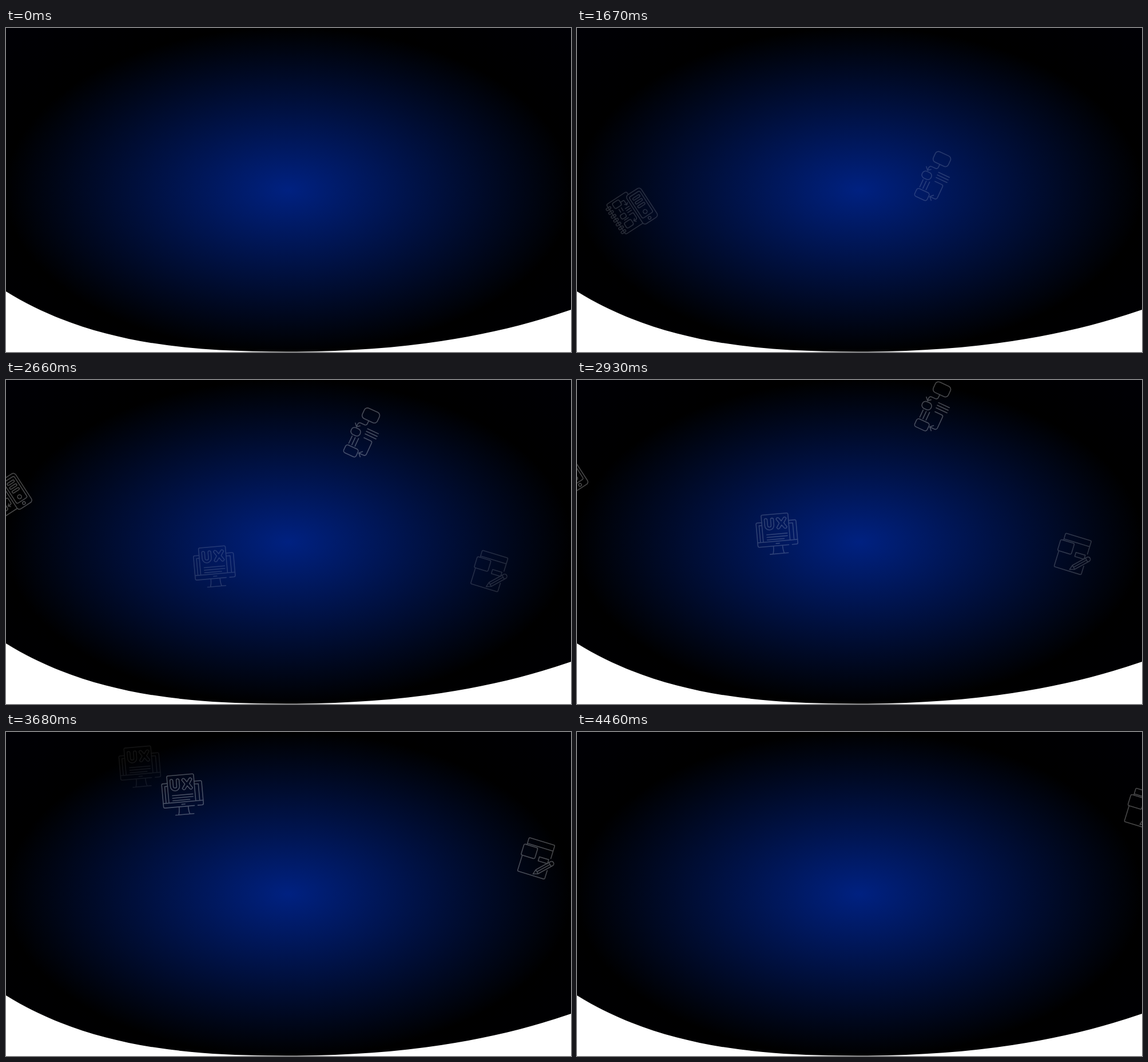
These frames come from a looping animation (988x567 px, 4.49 s). An HTML page:

```html
<!DOCTYPE html>
<html lang="en">
<head>
<meta charset="utf-8">
<title>Floating icons</title>
<style>
html, body { margin: 0; width: 100%; height: 100%; overflow: hidden; background: #fff; }
#stage { position: relative; width: 988px; height: 567px; overflow: hidden; }
#sky {
  position: absolute; inset: 0;
  background: radial-gradient(ellipse farthest-corner at 50% 50%, #002181, #000 71%, #000005);
}
svg { position: absolute; inset: 0; display: block; }
.icon { fill: none; stroke: #fff; stroke-width: 1.6; stroke-linecap: round; stroke-linejoin: round; }
</style>
</head>
<body>
<div id="stage">
  <div id="sky"></div>
  <svg id="view" width="988" height="567" viewBox="0 0 988 567">
    <defs>
      <g id="flow">
        <rect x="-13" y="-42.5" width="29" height="20" rx="6"/>
        <path d="M2-22.5V-17q0 4-4 4H-9q-4 0-4 4V-4M-17.5-9l4.5 5 5-4"/>
        <rect x="-19" y="-2" width="17" height="13" rx="6"/>
        <path d="M-13 14V28M-7 14V28M-1 13V28"/>
        <rect x="-16" y="31" width="24" height="15" rx="4"/>
        <path d="M6-9H27M6-4H27M6 1H27"/>
        <path d="M7 8H20q3 0 3 3V32q0 4-4 4H11M15 31l-5 5 5 5"/>
      </g>
      <g id="book">
        <path d="M4 28H-29q-3 0-3-3V-31q0-3 3-3H7q3 0 3 3v3"/>
        <g id="rings"></g>
        <rect x="-23" y="-30" width="14" height="11" rx="3"/>
        <path d="M-9-24h5q2 0 2 2v7M-5-17l3 3 3-3"/>
        <rect x="-23" y="-5" width="10" height="8" rx="3"/>
        <path d="M-18-9v-6M-13-9v-6M-8-10H0M-8-6H0M-8-2H0"/>
        <rect x="-24" y="10" width="14" height="11" rx="3"/>
        <path d="M-20 6h8M-8 3h6q2 0 2 2v8q0 3-3 3H-7M-4 13l-3 3 3 3"/>
        <rect x="4" y="-28" width="30" height="60" rx="5"/>
        <rect x="8" y="-23" width="22" height="44" rx="3"/>
        <rect x="12" y="-18" width="14" height="4" rx="2"/>
        <rect x="12" y="-10" width="14" height="4" rx="2"/>
        <rect x="12" y="-2" width="14" height="4" rx="2"/>
        <circle cx="18.5" cy="13" r="3.5"/>
        <circle cx="19" cy="26.5" r="2.5"/>
      </g>
      <g id="screen">
        <path d="M-25 12V-33q0-2 2-2H20q2 0 2 2V12"/>
        <path d="M-25-22h-8q-2 0-2 2V18q0 2.5 2.5 2.5H19M25 20.5h7.5q2.5 0 2.5-2.5V-20q0-2-2-2H22"/>
        <path d="M-25-17h-5V12M22-17h7V12M-35 12.5H35M-3 16.5H3"/>
        <path d="M-20-26v10a8 8 0 0 0 16 0v-10a2.5 2.5 0 0 0-5 0v10a3 3 0 0 1-6 0v-10a2.5 2.5 0 0 0-5 0z"/>
        <path d="M.5-26Q2.500-30 5.500-27.500L9.500-22 13.500-27.500Q16.500-30 18.500-26L13.500-18.500 18.500-11Q16.500-7 13.500-9.500L9.500-15 5.500-9.500Q2.500-7 .5-11L5.500-18.500Z"/>
        <path d="M-18 0H18M-18 4.500H18M-18 9H12"/>
        <path d="M-8 21Q-8 30-10 34.500M8 21Q8 30 10 34.500M-15 34.500H17"/>
      </g>
      <g id="draft">
        <path d="M-22-19.500V-30q0-2 2-2H23q2 0 2 2V-8M-22-21.500H25"/>
        <rect x="-27" y="-19" width="25" height="20" rx="2.500"/>
        <path d="M-24.500 1V28q0 2 2 2H23q2 0 2-2V14"/>
        <rect x="5" y="-5" width="17" height="7.500"/>
        <path transform="translate(3 27) rotate(-46)" d="M0 0L8-4H37a4 4 0 0 1 0 8H8zM8-4V4M9 0H33M34-4V4"/>
      </g>
    </defs>
    <g id="icons"></g>
    <path fill="#fff" d="M0 461C150 554 325 566.500 490 566.500C680 566.500 840 544 988 493V567H0Z"/>
  </svg>
</div>
<script>
const NS = "http://www.w3.org/2000/svg";
const LOOP = 4490, FIRST = 650, STEP = 30;
const FADE = 1900, PEAK = 0.28;

function add(parent, tag, attrs) {
  const el = document.createElementNS(NS, tag);
  for (const k in attrs) el.setAttribute(k, attrs[k]);
  return parent.appendChild(el);
}

const rings = document.getElementById("rings");
for (let i = 0; i < 7; i++) {
  add(rings, "rect", { x: -37, y: -28 + i * 8, width: 9, height: 4, rx: 2 });
}

// Each icon drifts in a straight line through (x, y) at time "at"; speeds in px per ms.
const icons = [
  { shape: "flow",   start: 640,  at: 2180, x: 623, y: 172, vx: 0,       vy: -0.169,  turn: 25 },
  { shape: "book",   start: 640,  at: 1130, x: 148.7, y: 384, vx: -0.0965, vy: -0.118, turn: -33 },
  { shape: "screen", start: 1690, at: 3200, x: 335, y: 212, vx: -0.0545, vy: -0.2127, turn: -5 },
  { shape: "draft",  start: 1690, at: 3200, x: 888, y: 275, vx: 0.0803,  vy: -0.111,  turn: 17 },
  { shape: "screen", start: 3190, at: 3680, x: 234, y: 61,  vx: -0.0545, vy: -0.2127, turn: -5 }
];
const layer = document.getElementById("icons");
for (const p of icons) {
  p.el = add(layer, "g", { class: "icon" });
  add(p.el, "use", { href: "#" + p.shape });
}

function draw(time) {
  const t = time < FIRST ? 0 : FIRST + Math.floor((time - FIRST) / STEP) * STEP;
  for (const p of icons) {
    const age = t - p.start;
    const x = p.x + p.vx * (t - p.at), y = p.y + p.vy * (t - p.at);
    p.el.setAttribute("transform", `translate(${x.toFixed(2)} ${y.toFixed(2)}) rotate(${p.turn})`);
    p.el.setAttribute("opacity", PEAK * Math.min(1, Math.max(0, age / FADE)));
  }
}

const begin = performance.now();
function tick() {
  draw((performance.now() - begin) % LOOP);
  requestAnimationFrame(tick);
}
tick();
</script>
</body>
</html>
```
